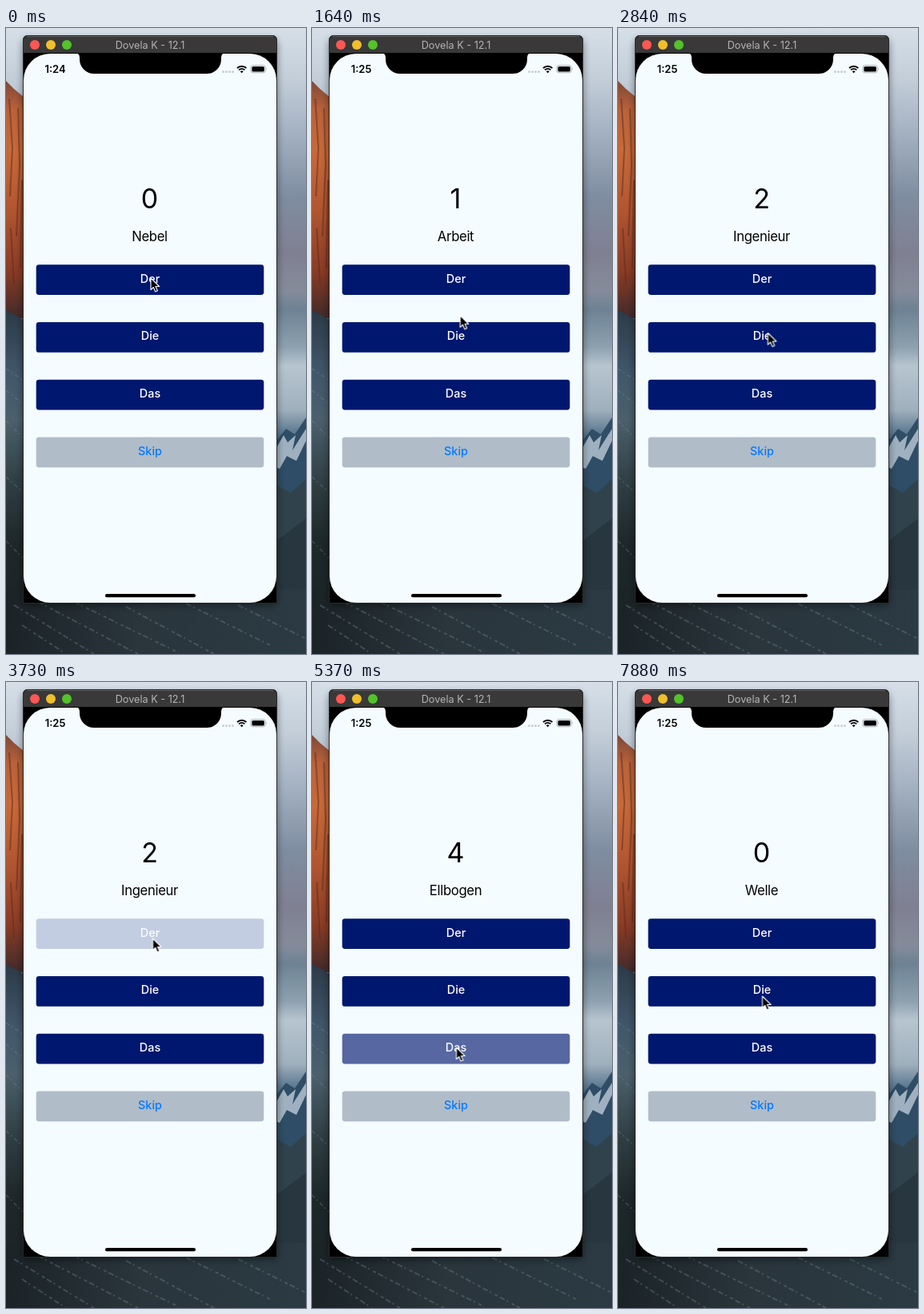
Write an HTML page that moves like this. It is 375 px wide and 781 px high and loops after 8 s.

```html
<!DOCTYPE html>
<html lang="de">
<head>
<meta charset="utf-8">
<title>Artikel-Quiz</title>
<style>
html, body { margin: 0; width: 100%; height: 100%; overflow: hidden; background: #26323a; }
svg { display: block; }
text { font-family: Inter, "Liberation Sans", sans-serif; text-anchor: middle; }
.title { font-size: 12.7px; fill: #b4b4b4; }
.clock text { font-size: 13px; font-weight: 600; }
.score { font-size: 34px; }
.word { font-size: 16.7px; letter-spacing: -.35px; }
.btn rect { fill: #00176f; }
.btn text { font-size: 14.4px; font-weight: 500; fill: #fff; }
.btn.skip rect { fill: #b0bcc8; }
.btn.skip text { fill: #007aff; }

.cards, .times, .btn, .cursor { animation: 8s step-end infinite; }
.cards { animation-name: cards; }
.times { animation-name: times; }
.der { animation-name: der; }
.die { animation-name: die; }
.das { animation-name: das; }
.cursor { animation-name: cursor; }

/* each card sits 100px below the previous one */
@keyframes cards {
  0% { transform: translateY(0); }
  1.875% { transform: translateY(-100px); }
  24.25% { transform: translateY(-200px); }
  48.5% { transform: translateY(-300px); }
  67.125% { transform: translateY(-400px); }
  94.875%, 100% { transform: translateY(-500px); }
}
@keyframes times {
  0% { transform: translateY(0); }
  11.125%, 100% { transform: translateY(-20px); }
}
/* press fades to .2, release fades back */
@keyframes der {
  0% { opacity: 1; }
  1.875% { opacity: .5; }
  3.75% { opacity: 1; }
  44.875% { opacity: .6; }
  46.625% { opacity: .2; }
  48.5% { opacity: .65; }
  50.375%, 100% { opacity: 1; }
}
@keyframes die {
  0% { opacity: 1; }
  24.25% { opacity: .3; }
  26.125% { opacity: .88; }
  28% { opacity: 1; }
  91.125% { opacity: .6; }
  93% { opacity: .2; }
  94.875% { opacity: .5; }
  96.75% { opacity: .95; }
  98.5%, 100% { opacity: 1; }
}
@keyframes das {
  0% { opacity: 1; }
  63.375% { opacity: .6; }
  65.25% { opacity: .2; }
  67.125% { opacity: .65; }
  69%, 100% { opacity: 1; }
}
@keyframes cursor {
  0% { transform: translate(181px, 312px); }
  7.375% { transform: translate(182.5px, 317px); animation-timing-function: steps(3); }
  13% { transform: translate(183px, 318.5px); }
  18.625% { transform: translate(184px, 330px); animation-timing-function: steps(2); }
  22.375% { transform: translate(186.5px, 387.5px); }
  31.75% { transform: translate(187.5px, 395px); }
  33.625% { transform: translate(188.5px, 401px); animation-timing-function: steps(4); }
  41.125% { transform: translate(184px, 319px); }
  44.875% { transform: translate(183.5px, 320px); }
  50.375% { transform: translate(184px, 332px); animation-timing-function: steps(4); }
  57.75% { transform: translate(181px, 453px); }
  59.625% { transform: translate(180.5px, 456px); }
  69% { transform: translate(181px, 440px); animation-timing-function: steps(3); }
  74.625% { transform: translate(178px, 305px); }
  76.5% { transform: translate(174px, 285px); }
  78.375% { transform: translate(173px, 268px); animation-timing-function: steps(3); }
  83.75% { transform: translate(184px, 314px); }
  85.625% { transform: translate(190px, 335px); }
  87.5% { transform: translate(188px, 370px); }
  89.25%, 100% { transform: translate(180.5px, 392px); }
}
</style>
</head>
<body>
<svg width="375" height="781" viewBox="0 0 375 781">
  <defs>
    <linearGradient id="sky" x2="0" y2="1">
      <stop stop-color="#d6dfe8"/><stop offset=".08" stop-color="#c3ced9"/>
      <stop offset=".17" stop-color="#a3b0c0"/><stop offset=".27" stop-color="#7f8da1"/>
      <stop offset=".36" stop-color="#7f8091"/><stop offset=".42" stop-color="#858b9a"/>
      <stop offset=".45" stop-color="#6d8294"/><stop offset=".51" stop-color="#8da1af"/>
      <stop offset=".54" stop-color="#b7c5cf"/><stop offset=".61" stop-color="#9fb0bd"/>
      <stop offset=".65" stop-color="#56748c"/><stop offset=".72" stop-color="#38536a"/>
      <stop offset=".8" stop-color="#33464f"/><stop offset="1" stop-color="#202b32"/>
    </linearGradient>
    <linearGradient id="rock" x2="0" y2="1">
      <stop stop-color="#7d4837"/><stop offset=".12" stop-color="#b9623a"/>
      <stop offset=".3" stop-color="#c76a3a"/><stop offset=".55" stop-color="#b05530"/>
      <stop offset=".8" stop-color="#8a3c25"/><stop offset="1" stop-color="#402a2a"/>
    </linearGradient>
    <linearGradient id="slope" x2="0" y2="1">
      <stop stop-color="#2b3a47"/><stop offset=".18" stop-color="#41576a"/>
      <stop offset=".32" stop-color="#4b606c"/><stop offset=".5" stop-color="#303f43"/>
      <stop offset=".68" stop-color="#1e2729"/><stop offset="1" stop-color="#1a2226"/>
    </linearGradient>
    <linearGradient id="floor" x2="1" y2="0">
      <stop stop-color="#1b2327"/><stop offset=".45" stop-color="#2a353c"/><stop offset="1" stop-color="#2b3a43"/>
    </linearGradient>
    <filter id="soft" x="-20%" y="-5%" width="140%" height="110%"><feGaussianBlur stdDeviation="5"/></filter>
  </defs>

  <rect width="375" height="781" fill="url(#sky)"/>
  <path d="M0 66L10 76 22 86H30V362H0Z" fill="url(#rock)"/>
  <g fill="none" stroke="#5d2a1f" stroke-width="2" opacity=".5">
    <path d="M4 88L8 150 5 210M15 100L17 170 13 260M20 190L18 300M6 250L10 320"/>
  </g>
  <path d="M0 352L22 364H30V781H0Z" fill="url(#slope)"/>
  <g fill="none" stroke="#7a8b92" stroke-width="1.5" opacity=".35">
    <path d="M0 425L22 440M0 452L22 470M0 490L22 512M0 560L22 580M0 640L22 662" stroke-dasharray="5 3 2 4"/>
  </g>
  <path d="M338 515L350 500 361 507 375 486V600H338Z" fill="#2f4d66"/>
  <path d="M338 524L347 508 352 517 362 508 358 527 375 500V515L363 540 351 534 342 550 338 548Z" fill="#c5d3de" opacity=".75"/>
  <path d="M338 570L356 580 375 563V781H338Z" fill="#30424c"/>
  <path d="M338 640L375 612V781H338Z" fill="#26343c" opacity=".8"/>
  <path d="M0 700H375V781H0Z" fill="url(#floor)"/>
  <g fill="none" stroke="#71828b" stroke-width="2" opacity=".4" stroke-dasharray="7 3 2 5 4 3">
    <path d="M10 720L110 781M40 716L165 781M85 716L215 779M20 745L75 781M150 722L260 781M225 718L330 770M290 720L375 762"/>
  </g>

  <rect x="21" y="14" width="318" height="706" rx="6" opacity=".45" filter="url(#soft)"/>
  <path d="M21.5 717.5V15Q21.5 9.5 27 9.5H333Q338.5 9.5 338.5 15V717.5Z" fill="#000" stroke="#29292b"/>
  <path d="M22 31V15Q22 10 27 10H333Q338 10 338 15V31Z" fill="#393939"/>
  <path d="M26 10.5H334" stroke="#606060"/>
  <circle cx="36" cy="21" r="6" fill="#fc5753"/>
  <circle cx="56" cy="21" r="6" fill="#f0bf2b"/>
  <circle cx="76" cy="21" r="6" fill="#53c22b"/>
  <text class="title" x="180" y="25.8">Dovela K - 12.1</text>

  <rect x="22" y="32" width="316" height="685" rx="33" fill="#f5fcff"/>
  <path d="M86 31Q92 31 92 37V39A18 18 0 0 0 110 57H251A18 18 0 0 0 269 39V37Q269 31 275 31Z"/>
  <rect x="124" y="706" width="113" height="4.3" rx="2.1"/>

  <svg class="clock" x="42" y="42" width="40" height="20">
    <g class="times"><text x="19.5" y="14">1:24</text><text x="19.5" y="34">1:25</text></g>
  </svg>
  <path d="M271.5 54.7H284" stroke="#c4cbd0" stroke-width="2.8" stroke-linecap="round" stroke-dasharray="0 4"/>
  <g fill="none" stroke="#000" stroke-width="1.9">
    <path d="M289 50A8.2 8.2 0 0 1 300.4 50M291.1 52.4A5 5 0 0 1 298.3 52.4"/>
  </g>
  <path d="M294.7 56.2L292.8 54.2A2.7 2.7 0 0 1 296.6 54.2Z"/>
  <rect x="306" y="46.6" width="18.2" height="9.2" rx="2.6" fill="none" stroke="#a4a9ab" stroke-width=".9"/>
  <rect x="307.4" y="48" width="15.4" height="6.4" rx="1.5"/>
  <path d="M325.2 49.6Q326.6 51.2 325.2 52.8Z" fill="#a4a9ab"/>

  <svg x="22" y="180" width="316" height="100">
    <g class="cards">
      <text class="score" x="157.5" y="45">0</text><text class="word" x="157.5" y="86">Nebel</text>
      <text class="score" x="157.5" y="145">1</text><text class="word" x="157.5" y="186">Arbeit</text>
      <text class="score" x="157.5" y="245">2</text><text class="word" x="157.5" y="286">Ingenieur</text>
      <text class="score" x="157.5" y="345">3</text><text class="word" x="157.5" y="386">Rad</text>
      <text class="score" x="157.5" y="445">4</text><text class="word" x="157.5" y="486">Ellbogen</text>
      <text class="score" x="157.5" y="545">0</text><text class="word" x="157.5" y="586">Welle</text>
    </g>
  </svg>

  <g class="btn der"><rect x="37.7" y="295.2" width="284.6" height="37.8" rx="3.4"/><text x="180" y="317.7">Der</text></g>
  <g class="btn die"><rect x="37.7" y="367" width="284.6" height="37.8" rx="3.4"/><text x="180" y="389.3">Die</text></g>
  <g class="btn das"><rect x="37.7" y="438.7" width="284.6" height="37.8" rx="3.4"/><text x="180" y="461">Das</text></g>
  <g class="btn skip"><rect x="37.7" y="510.4" width="284.6" height="37.8" rx="3.4"/><text x="180" y="532.7">Skip</text></g>

  <path class="cursor" d="M0 0V14.6L3.3 11.5 5.7 17 8.4 15.8 6 10.5H10.6Z" stroke="#fff" stroke-width="1.1" stroke-linejoin="round"/>
</svg>
</body>
</html>
```
